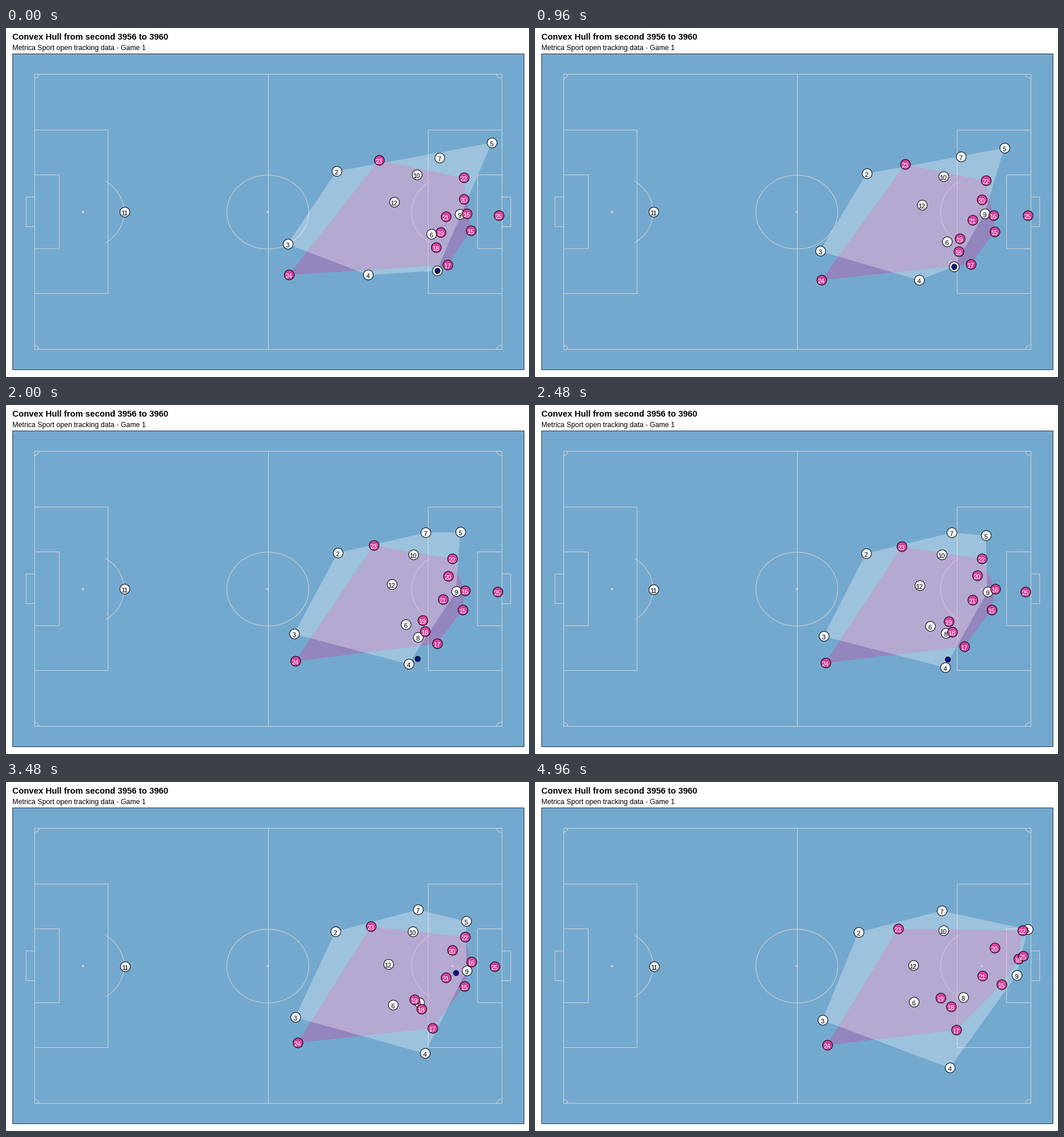
These frames come from a looping animation (900 by 600 pixels, 5000 ms). A matplotlib script:

```python
import numpy as np
import matplotlib.pyplot as plt
from matplotlib.animation import FuncAnimation
from matplotlib.colors import to_rgba
from matplotlib.patches import Arc, Ellipse, Polygon, Rectangle

FPS, FRAMES = 25, 125
PX = 0.72  # points per pixel at 100 dpi
FIELD, LINE, PINK = "#74a9cf", "#d3d3d3", "#dd3497"

plt.rcParams["font.family"] = "Liberation Sans"
fig = plt.figure(figsize=(9, 6), dpi=100, facecolor="white")
ax = fig.add_axes([0, 0, 1, 1])
# Whole coordinates fall on pixel centres, counted from 1
ax.set(xlim=(0.5, 900.5), ylim=(600.5, 0.5))
ax.axis("off")


# Pitch, mirrored about the halfway line
MID_X, MID_Y = 451, 317


def box(x0, y0, x1, y1, color=LINE, fill="none"):
    ax.add_patch(Rectangle((x0, y0), x1 - x0, y1 - y0, fc=fill, ec=color,
                           lw=PX, snap=True, zorder=1))


def arc(x, y, w, h, start, end):
    ax.add_patch(Arc((x, y), w, h, theta1=start, theta2=end, color=LINE,
                     lw=PX, zorder=1))


def spot(x):
    ax.add_patch(Ellipse((x, MID_Y), 4, 4, fc=LINE, ec="none", zorder=1))


box(11, 45, 891, 588, "#26333b", FIELD)
box(49, 80, 853, 553)
box(49, 80, MID_X, 553)
for y0, y1, left, right in [(176, 457, (49, 175), (726, 853)),
                            (253, 380, (49, 91), (811, 853)),
                            (291, 342, (34, 49), (853, 868))]:
    for x0, x1 in (left, right):
        box(x0, y0, x1, y1)
arc(MID_X, MID_Y, 141, 127, 0, 360)
for x, facing in [(133, 0), (769, 180)]:
    arc(x, MID_Y, 141, 127, facing - 53.4, facing + 53.4)
for i, (x, y) in enumerate([(49, 80), (853, 80), (853, 553), (49, 553)]):
    arc(x, y, 16, 14, 90 * i, 90 * i + 90)
for x in (133, MID_X, 769):
    spot(x)

ax.text(11.5, 20.5, "Convex Hull from second 3956 to 3960",
        size=14.6 * PX, weight="bold")
ax.text(11.5, 38.5, "Metrica Sport open tracking data - Game 1",
        size=12.1 * PX)


# Motion
def glide(points):
    """Smooth run through points evenly spaced in time, one row per frame."""
    p = np.array(points, float)
    slope = np.gradient(p, axis=0, edge_order=min(2, len(p) - 1))
    t = np.linspace(0, len(p) - 1, FRAMES)
    i = np.minimum(t.astype(int), len(p) - 2)
    u = (t - i)[:, None]
    ease = u * u * (3 - 2 * u)
    return (p[i] + (p[i + 1] - p[i]) * ease
            + u * (1 - u) ** 2 * slope[i] - u * u * (1 - u) * slope[i + 1])


def turn(a, b, c):
    return (b[0] - a[0]) * (c[1] - a[1]) - (b[1] - a[1]) * (c[0] - a[0])


def half_hull(points):
    out = []
    for p in points:
        while len(out) > 1 and turn(out[-2], out[-1], p) <= 0:
            out.pop()
        out.append(p)
    return out[:-1]


def hull(points):
    points = sorted(map(tuple, points))
    return half_hull(points) + half_hull(points[::-1])


class Team:
    def __init__(self, keeper, color, ink, hull_z, z):
        self.keeper, self.ink, self.z = keeper, ink, z
        self.tracks, self.labels = {}, {}
        self.area = ax.add_patch(Polygon([(0, 0)] * 3, fc=color, alpha=0.3,
                                         lw=0, zorder=hull_z))
        self.dots = ax.scatter([], [], s=(17 * PX) ** 2, lw=PX, ec="black",
                               fc=[to_rgba(color, 0.88)], zorder=z)

    def add(self, number, *points):
        self.tracks[number] = glide(points)
        self.labels[number] = ax.text(0, 0, str(number), size=11 * PX,
                                      color=self.ink, ha="center",
                                      zorder=self.z + 0.5)

    def show(self, frame):
        places = {n: np.rint(p[frame]) for n, p in self.tracks.items()}
        self.dots.set_offsets(list(places.values()))
        self.area.set_xy(hull(p for n, p in places.items() if n != self.keeper))
        for n, (x, y) in places.items():
            self.labels[n].set_position((x, y + 5.5))


home = Team(11, "#ffffff", "black", hull_z=3, z=4)
home.add(2, (569, 247), (570.5, 256), (557, 259))
home.add(3, (485, 372), (497, 398), (495, 410))
home.add(4, (623, 425), (683, 442), (720, 464), (714, 492))
home.add(5, (836, 198), (801, 210), (776, 225), (799, 243), (848, 254))
home.add(6, (732, 355), (680, 381), (652, 379))
home.add(7, (746, 224), (717, 220), (700, 222))
home.add(8, (742, 418), (712, 404), (710, 382), (737, 371))
home.add(9, (781, 321), (779, 322), (829, 333))
home.add(10, (707, 253), (700, 258), (703, 256))
home.add(11, (204, 317), (205, 318))
home.add(12, (668, 300), (662, 311), (651, 316))

away = Team(25, PINK, "white", hull_z=2, z=5)
away.add(15, (800, 349), (786, 353), (803, 349))
away.add(16, (793, 320), (789, 322), (799, 311), (832, 305))
away.add(17, (760, 408), (744, 409), (735, 423), (725, 427))
away.add(18, (740, 378), (718, 391), (716, 387))
away.add(19, (748, 352), (711.5, 373), (698, 372))
away.add(20, (788, 295), (762, 295.5), (766, 291), (791, 286))
away.add(21, (757, 325), (753, 336.5), (770, 334))
away.add(22, (788, 258), (774, 264), (769, 265), (797, 267), (839, 256))
away.add(23, (642, 228), (631, 244.5), (625, 253))
away.add(24, (487, 425), (500, 444), (503, 453))
away.add(25, (848, 323), (847, 322), (841.5, 319.5), (840, 300))

# The ball stays with number 8, is passed to 4, then crossed out of play
ball = ax.scatter([], [], s=(9 * PX) ** 2, lw=PX, ec="black",
                  fc=[(0, 0, 0.53, 0.9)], zorder=7)
PASS, CROSS, OUT = 1.6, 2.39, 4.5
BALL = np.array([(PASS, 713, 404), (2, 708, 437), (CROSS, 704, 448),
                 (3.48, 774, 329), (OUT, 839, 235)])


def ball_at(frame):
    t = frame / FPS
    if t < PASS:
        return home.tracks[8][frame]
    return [np.interp(t, BALL[:, 0], BALL[:, k]) for k in (1, 2)]


def draw(frame):
    home.show(frame)
    away.show(frame)
    ball.set_offsets([np.rint(ball_at(frame))])
    ball.set_visible(frame / FPS < OUT)
    return []


anim = FuncAnimation(fig, draw, frames=FRAMES, interval=1000 / FPS,
                     repeat=True, repeat_delay=0)
plt.show()
```
